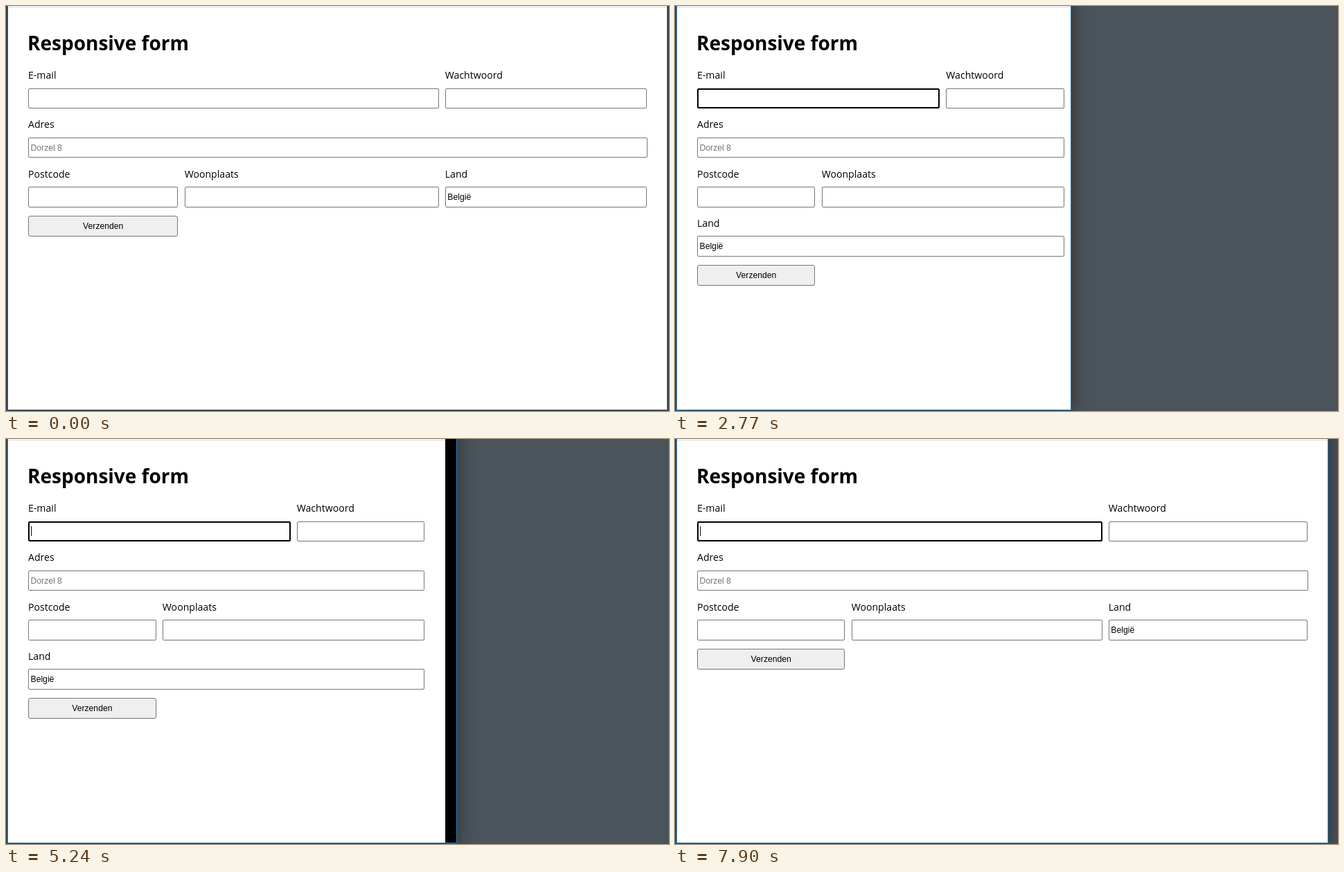
An HTML page for the animation above (8000 ms loop, 957 by 585 pixels).

```html
<!DOCTYPE html>
<html lang="nl">
<head>
<meta charset="utf-8">
<title>Responsive form</title>
<style>
  html, body { margin: 0; width: 100%; height: 100%; overflow: hidden; background: #4b545b; }
  #stage { position: relative; width: 957px; height: 585px; overflow: hidden; }
  #stage div { position: absolute; box-sizing: border-box; white-space: nowrap; }
  #window {
    left: 2px; top: -60px; height: 644px; overflow: hidden; background: #000;
    border: 1px solid #4a4f55; box-shadow: 0 4px 24px rgba(0, 0, 0, .45);
  }
  #window.active { border-color: #2a7ab8; }
  #page { left: 0; top: 59px; height: 590px; background: #fff; color: #000; }
  #topline { left: 0; top: 1px; width: 100%; height: 1px; background: #d9d9d9; }
  #title { left: 28px; top: 33px; font: bold 28px/40px "Open Sans", sans-serif; }
  .label { font: 14.1px/20px "Open Sans", sans-serif; }
  .box {
    height: 29.6px; padding-left: 2.5px; border: 1px solid #767676; border-radius: 2px;
    font: 12.2px/28px "Liberation Sans", Arial, sans-serif;
  }
  .placeholder { color: #757575; }
  .button { padding: 0; background: #efefef; text-align: center; border-radius: 3px; }
  .focus { border: 2px solid #000; }
  #caret { left: 33px; top: 126px; width: 1px; height: 14px; background: #000; }
</style>
</head>
<body>
<div id="stage">
  <div id="window">
    <div id="page">
      <div id="topline"></div>
      <div id="title">Responsive form</div>
      <div id="caret"></div>
    </div>
  </div>
</div>
<script>
const LOOP = 8000, TICK = 1000 / 15, TICK_OFFSET = TICK / 2;
const LEFT = 29, RIGHT_MARGIN = 32.5, GAP = 9.2, ROW = 71.2;
const MEDIUM = 587, LARGE = 880;

// Right edge of the window: [time in ms, x]
const edgeKeys = [
  [433, 955], [500, 954], [767, 946], [967, 931], [1033, 916], [1100, 895], [1167, 889],
  [1300, 885], [1700, 877], [1767, 877], [2033, 777], [2100, 764], [2633, 611],
  [3100, 474], [3167, 467], [4367, 467], [4500, 482], [5167, 634], [5233, 651],
  [5967, 814], [6033, 814], [6100, 832], [6500, 878], [6967, 910], [7233, 910],
  [7500, 927], [7833, 943]
];
const caretOn = [[500, 1095], [1835, 2435], [3635, 4235], [4835, 5435], [6035, 6635], [7295, 8000]];

// Column spans for the small, medium and large layouts
const fields = [
  { label: "E-mail", spans: [12, 8, 8] },
  { label: "Wachtwoord", spans: [12, 4, 4] },
  { label: "Adres", text: "Dorzel 8", style: "placeholder", spans: [12, 12, 12] },
  { label: "Postcode", spans: [12, 4, 3] },
  { label: "Woonplaats", spans: [12, 8, 5] },
  { label: "Land", text: "België", spans: [12, 12, 4] },
  { text: "Verzenden", style: "button", spans: [12, 4, 3] }
];

const byId = id => document.getElementById(id);
const frame = byId("window"), page = byId("page"), caret = byId("caret");

function addDiv(className, text = "") {
  const div = document.createElement("div");
  div.className = className;
  div.textContent = text;
  page.insertBefore(div, caret);
  return div;
}

for (const field of fields) {
  if (field.label) field.labelDiv = addDiv("label", field.label);
  field.boxDiv = addDiv("box " + (field.style || ""), field.text);
}

function edgeAt(time) {
  const next = edgeKeys.findIndex(key => key[0] > time);
  if (next === 0) return edgeKeys[0][1];
  if (next < 0) return edgeKeys[edgeKeys.length - 1][1];
  const [t0, x0] = edgeKeys[next - 1], [t1, x1] = edgeKeys[next];
  return x0 + (x1 - x0) * (time - t0) / (t1 - t0);
}

function place(div, x, y) {
  div.style.left = x + "px";
  div.style.top = y + "px";
}

function layOut(right) {
  const size = right < MEDIUM ? 0 : right < LARGE ? 1 : 2;
  const unit = (right - RIGHT_MARGIN - LEFT + 3 - 3 + GAP) / 12;
  let column = 0, row = 0;
  for (const { spans, labelDiv, boxDiv } of fields) {
    const span = spans[size];
    if (column + span > 12) {
      column = 0;
      row++;
    }
    const x = LEFT + column * unit, y = 118.6 + row * ROW;
    if (labelDiv) place(labelDiv, x, y - 28.4);
    place(boxDiv, x, labelDiv ? y : y - ROW + 42.2);
    boxDiv.style.width = span * unit - GAP + "px";
    column += span;
  }
}

function draw(now) {
  const time = now % LOOP;
  const tick = Math.floor((time - TICK_OFFSET + 1) / TICK) * TICK + TICK_OFFSET;
  const active = time >= 499;
  // The page follows the window edge one tick late
  const pageRight = edgeAt(tick - TICK);
  frame.style.width = edgeAt(tick) - 2 + "px";
  page.style.width = pageRight - 3 + "px";
  frame.classList.toggle("active", active);
  fields[0].boxDiv.classList.toggle("focus", active);
  caret.hidden = !caretOn.some(([from, to]) => time >= from && time < to);
  layOut(pageRight);
  requestAnimationFrame(draw);
}
requestAnimationFrame(draw);
</script>
</body>
</html>
```
